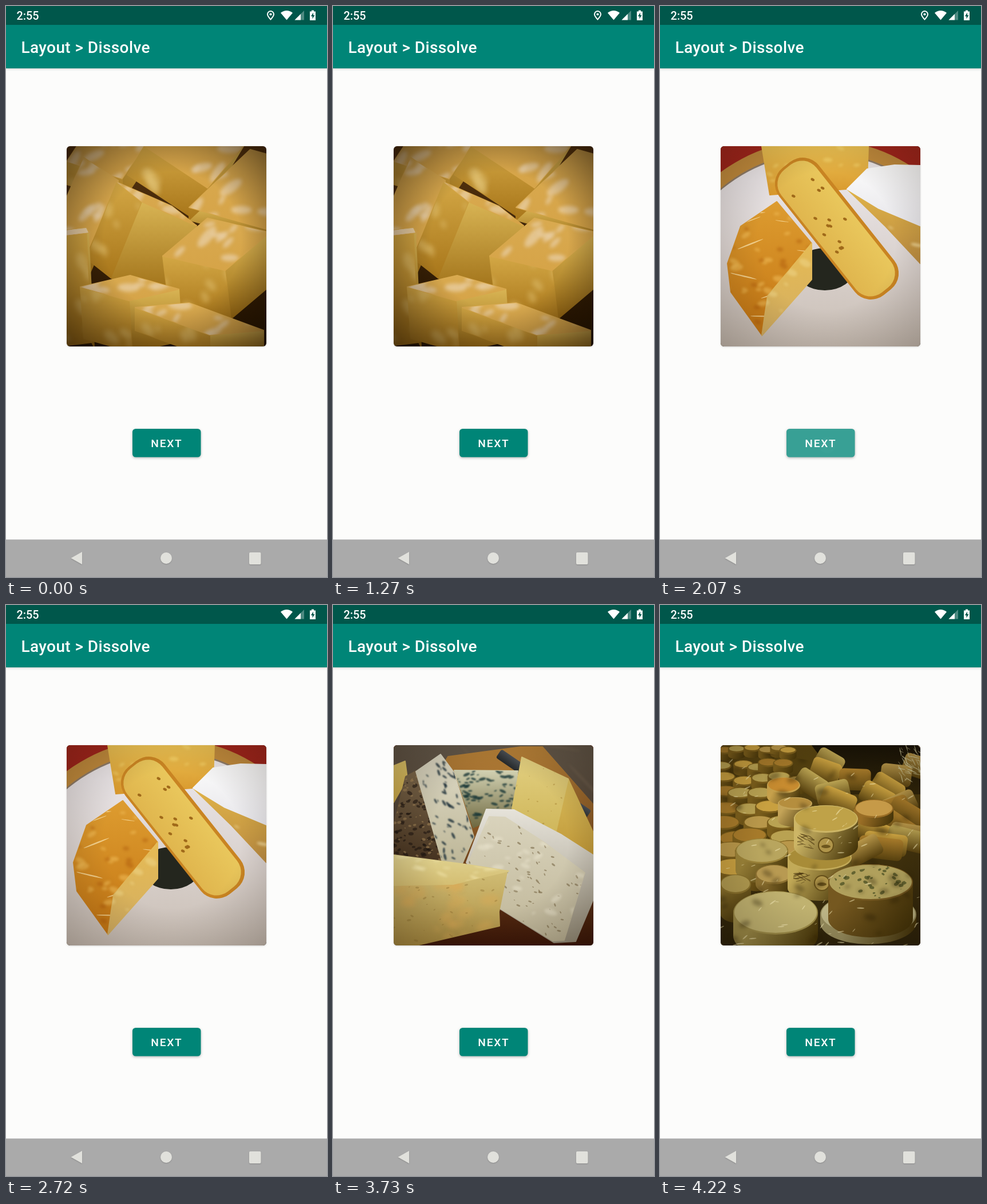
Write an HTML page with a canvas that moves like this. It is 561 px wide and 998 px high and loops after 4430 ms.

```html
<!DOCTYPE html>
<html lang="en">
<head>
<meta charset="utf-8">
<title>Layout &gt; Dissolve</title>
<style>
html, body { margin: 0; width: 100%; height: 100%; overflow: hidden; background: #fcfcfb; }
canvas { display: block; }
</style>
</head>
<body>
<canvas id="stage" width="561" height="998"></canvas>
<script>
const LOOP = 4430;
const TAPS = [1800, 2830, 3800];
const PHOTO = { x: 106, y: 245, size: 350 };
const BUTTON = [221, 739, 119.5, 49.5, 5.5];
const TOUCH = { x: 292.5, y: 768 };
const FONT = 'Roboto, "Noto Sans", sans-serif';
const ctx = document.getElementById('stage').getContext('2d');

let g, rnd;

const span = (t, a, b) => Math.min(1, Math.max(0, (t - a) / (b - a)));
const between = (a, b) => a + rnd() * (b - a);

function seeded(seed) {
  return () => {
    seed = (seed + 0x6D2B79F5) | 0;
    let r = Math.imul(seed ^ (seed >>> 15), 1 | seed);
    r = (r + Math.imul(r ^ (r >>> 7), 61 | r)) ^ r;
    return ((r ^ (r >>> 14)) >>> 0) / 4294967296;
  };
}

// cubic-bezier(.4, 0, .2, 1)
function fastOutSlowIn(x) {
  let lo = 0, hi = 1, u = x;
  for (let i = 0; i < 16; i++) {
    u = (lo + hi) / 2;
    if (1.2 * u * (1 - u) ** 2 + 0.6 * u * u * (1 - u) + u ** 3 < x) lo = u; else hi = u;
  }
  return 3 * u * u * (1 - u) + u ** 3;
}

// ---- photos, painted in their own coordinates ----

function shade(c1, c2, x0, y0, x1, y1) {
  const grad = g.createLinearGradient(x0, y0, x1, y1);
  grad.addColorStop(0, c1);
  grad.addColorStop(1, c2);
  return grad;
}

function trace(p) {
  g.beginPath();
  for (let i = 0; i < p.length; i += 2) g.lineTo(p[i], p[i + 1]);
  g.closePath();
}

function bounds(p) {
  const xs = p.filter((_, i) => i % 2 === 0), ys = p.filter((_, i) => i % 2);
  return [Math.min(...xs), Math.min(...ys), Math.max(...xs), Math.max(...ys)];
}

// Polygon shaded from top to bottom; returns its points.
function face(p, c1, c2 = c1) {
  const [, y0, , y1] = bounds(p);
  trace(p);
  g.fillStyle = g.strokeStyle = shade(c1, c2, 0, y0, 0, y1);
  g.lineJoin = 'round';
  g.lineWidth = 2;
  g.fill();
  g.stroke();
  return p;
}

// Scattered soft ellipses kept inside a polygon; returns its points.
function mottle(p, color, n, w, h, angle = 0, blur = 2) {
  const [x0, y0, x1, y1] = bounds(p);
  g.save();
  trace(p);
  g.clip();
  g.filter = `blur(${blur}px)`;
  for (let i = 0; i < n; i++) {
    const s = between(0.4, 1.3);
    oval(between(x0, x1), between(y0, y1), w * s, h * s, color, angle + between(-0.6, 0.6));
  }
  g.restore();
  return p;
}

function oval(x, y, rx, ry, fill, angle = 0) {
  g.beginPath();
  g.ellipse(x, y, rx, ry, angle, 0, 7);
  g.fillStyle = fill;
  g.fill();
}

function slab(x, y, w, h, angle, r, c1, c2) {
  g.save();
  g.translate(x, y);
  g.rotate(angle);
  g.beginPath();
  g.roundRect(-w / 2, -h / 2, w, h, r);
  g.fillStyle = shade(c1, c2, 0, -h / 2, 0, h / 2);
  g.fill();
  g.restore();
}

function wheel(x, y, rx, ry, h, top, side) {
  g.beginPath();
  g.ellipse(x, y + h, rx, ry, 0, 0, Math.PI);
  g.ellipse(x, y, rx, ry, 0, Math.PI, 2 * Math.PI);
  g.fillStyle = shade(side, '#463509', x - rx / 2, y, x + rx, y + h);
  g.fill();
  oval(x, y, rx, ry, side);
  oval(x, y - 1, rx - 2, ry - 2, top);
}

// Marbled block: nearest top corner and its left, right and downward edges.
function block([x, y], [ax, ay], [bx, by], [dx, dy]) {
  const side = (ex, ey) => [x, y, x + ex, y + ey, x + ex + dx, y + ey + dy, x + dx, y + dy];
  face(side(bx, by), '#d8b454', '#9a6a12');
  mottle(face(side(ax, ay), '#d3a745', '#a8761a'), 'rgba(232,204,130,.4)', 6, 16, 9, 1, 4);
  const top = face([x, y, x + ax, y + ay, x + ax + bx, y + ay + by, x + bx, y + by], '#d9aa50', '#d6a448');
  mottle(top, 'rgba(234,210,172,.7)', 13, 18, 7, -0.5, 3);
}

const backdrop = (c1, c2) => face([0, 0, 350, 0, 350, 350, 0, 350], c1, c2);

function vignette(alpha) {
  const v = g.createRadialGradient(185, 165, 120, 175, 175, 270);
  v.addColorStop(0, 'rgba(20,10,0,0)');
  v.addColorStop(1, `rgba(20,10,0,${alpha})`);
  g.fillStyle = v;
  g.fillRect(0, 0, 350, 350);
}

function cubes() {
  backdrop('#56340f', '#221200');
  block([97, 57], [-97, -30], [40, -60], [0, 40]);
  block([40, 175], [-60, -40], [50, -115], [-5, 60]);
  block([246, 73], [-110, -73], [63, -73], [-30, 50]);
  block([214, 107], [107, -101], [135, 38], [0, 22]);
  block([131, 97], [-43, -34], [96, 42], [-54, 133]);
  block([277, 217], [-109, -25], [78, -66], [10, 85]);
  block([34, 143], [-50, 6], [4, 8], [10, 200]);
  block([109, 270], [-85, -24], [87, -20], [6, 90]);
  block([250, 330], [-130, -48], [94, -8], [0, 40]);
  vignette(0.7);
}

function brie() {
  backdrop('#a3251c', '#7c1710');
  oval(174, 278, 291, 290, '#c08a3c');
  oval(174, 279, 269, 269, '#8f7c68');
  oval(174, 281, 268, 268, shade('#e9e4e6', '#c9beb4', 0, 60, 0, 350));
  mottle(face([72, 0, 258, 0, 256, 60, 220, 75, 86, 85], '#ecc253', '#d8972c'), 'rgba(250,222,120,.5)', 14, 9, 4);
  oval(182, 215, 51, 37, '#24261e');
  mottle(face([221, 75, 349, 90, 349, 205, 288, 140], '#e0b348', '#b98a40'), 'rgba(246,226,170,.7)', 12, 12, 3, 0.5);
  face([221, 75, 256, 40, 304, 33, 349, 34, 349, 139, 275, 108], '#fbfbfb', '#e7e6ea');

  const rind = face([35, 140, 98, 97, 159, 170, 72, 330, 18, 255, 12, 205], '#dd9c30', '#c57613');
  mottle(rind, 'rgba(240,190,90,.55)', 24, 10, 5);
  mottle(rind, 'rgba(170,85,10,.4)', 24, 6, 4);
  mottle(rind, 'rgba(252,232,180,.7)', 9, 20, 1, 0.2, 0.5);
  mottle(face([159, 170, 159, 233, 72, 331, 82, 262], '#e6bb54', '#d3ae62'), 'rgba(240,215,140,.5)', 10, 9, 5);

  slab(203, 144, 284, 88, 0.9, 36, '#c98422', '#c98422');
  slab(202, 144, 274, 78, 0.9, 32, '#e9c75c', '#e0b64e');
  for (let i = 0; i < 14; i++) {
    const along = between(-100, 90), across = between(-26, 26);
    oval(202 + along * 0.62 - across * 0.78, 144 + along * 0.78 + across * 0.62, 3.5, 2.3, '#a06a1a', 0.5);
  }
  vignette(0.28);
}

function board() {
  mottle(backdrop('#655a4c', '#2e1c10'), 'rgba(140,120,96,.3)', 40, 40, 2, 0.5);
  face([95, 20, 222, 3, 260, 3, 350, 105, 350, 350, 0, 350, 0, 185], '#b88238', '#3c1608');
  face([0, 36, 20, 28, 24, 58, 0, 100], '#e5ca6c', '#c9a848');
  slab(262, 68, 190, 18, 0.6, 4, '#4a5056', '#25282a');

  const blue = face([106, 44, 217, 45, 209, 112, 139, 144], '#d2d1b2', '#6e6840');
  mottle(blue, 'rgba(24,54,54,.8)', 90, 5, 2, 0, 0.8);
  const crust = face([21, 55, 40, 45, 84, 201, 0, 193, 0, 139], '#7c684c', '#463320');
  mottle(crust, 'rgba(30,22,16,.6)', 90, 4, 2.5, 0, 0.7);
  mottle(crust, 'rgba(172,140,92,.5)', 70, 3, 2, 0, 0.7);
  const vein = face([39, 46, 82, 16, 105, 47, 140, 160, 120, 207, 84, 201], '#dedac6', '#beb798');
  mottle(vein, 'rgba(28,46,56,.8)', 110, 5, 1.8, 1, 0.8);

  face([305, 59, 350, 155, 350, 191, 283, 154], '#d8bc5c', '#c09838');
  const wedge = face([224, 21, 305, 59, 283, 154, 207, 111], '#e2cf80', '#cfb65a');
  mottle(wedge, 'rgba(168,132,52,.5)', 24, 1.8, 1.2, 0, 0.4);

  face([127, 205, 162, 112, 210, 113, 294, 157, 350, 193, 350, 267, 318, 343, 280, 345, 184, 285], '#e6e3da', '#9a927e');
  const white = face([131, 205, 167, 125, 195, 126, 262, 169, 334, 223, 298, 341, 278, 342, 186, 285], '#d9d3bc', '#bfb698');
  mottle(white, 'rgba(120,104,70,.6)', 110, 3, 1.3, 0.6, 0.6);
  mottle(white, 'rgba(236,230,208,.5)', 35, 9, 4);

  const cut = face([0, 243, 198, 222, 184, 291, 185, 316, 44, 349, 0, 350], '#d0bc74', '#ac8e42');
  mottle(cut, 'rgba(220,170,86,.4)', 24, 14, 8, 0, 4);
  mottle(cut, 'rgba(140,110,48,.4)', 40, 3, 1.4, 0, 0.6);
  mottle(face([0, 192, 124, 208, 201, 220, 104, 243, 0, 245], '#e0d290', '#d4be72'), 'rgba(244,232,176,.6)', 16, 14, 3);
  vignette(0.34);
}

function market() {
  backdrop('#574310', '#2c220a');
  face([160, 0, 350, 0, 350, 85, 224, 85], '#171206', '#30250a');
  const pick = () => ['#b8974a', '#b9a252', '#a67a2a', '#c8a040'][Math.floor(rnd() * 4)];

  // The stacks grow larger towards the front.
  for (let row = 0; row < 9; row++) {
    const r = 15 + row * 2.5;
    for (let x = 0; x < 130; x += r * 1.5) {
      wheel(x + between(0, r), 10 + row * 25 + between(-5, 5), r, r * 0.45, r * 0.7, pick(), '#7c5f1c');
    }
  }
  for (let i = 0; i < 22; i++) {
    const d = i / 22;
    slab(between(140 + 80 * d, 345), 30 + 165 * d, 50 + 30 * d, 38, between(-0.5, 0.7), 8, pick(), '#57410f');
  }
  mottle([310, 0, 350, 0, 350, 65, 310, 65], 'rgba(208,204,160,.7)', 50, 7, 0.7, 0.8, 0.3);

  wheel(110, 70, 29, 14, 20, '#c88c30', '#c8a24c');
  wheel(268, 111, 34, 16, 16, '#c69a48', '#9a6e26');
  wheel(130, 102, 30, 11, 30, '#b58e3e', '#c4a458');
  wheel(72, 185, 46, 22, 34, '#b8a55e', '#9a8238');
  wheel(26, 243, 27, 17, 50, '#b09a50', '#88702c');
  wheel(93, 226, 32, 17, 17, '#b89a52', '#8c7030');
  wheel(173, 197, 56, 22, 53, '#a88c38', '#c2aa58');
  wheel(184, 129, 56, 24, 48, '#bfa248', '#cdb666');
  for (const [x, y] of [[184, 175], [177, 241]]) {
    oval(x, y, 14, 14, '#66501a');
    oval(x, y, 12, 12, '#b0954a');
    oval(x, y + 2, 8, 3, '#6d561d');
    mottle([x - 50, y - 22, x - 20, y - 14, x - 20, y + 8, x - 50, y], 'rgba(78,58,18,.6)', 16, 9, 1, 0.2, 0.4);
  }
  wheel(96, 293, 74, 38, 40, '#c0b270', '#9c8b48');
  wheel(258, 296, 84, 38, 14, '#bdb586', '#958b5c');
  wheel(262, 240, 74, 32, 64, '#b0a05c', '#755820');
  mottle([195, 225, 290, 210, 330, 245, 280, 268, 210, 255], 'rgba(68,74,32,.7)', 50, 4, 2.5, 0, 0.7);
  const all = [0, 0, 350, 60, 350, 350, 0, 350];
  mottle(all, 'rgba(40,28,4,.35)', 60, 9, 5, 0, 3);
  mottle(all, 'rgba(250,240,190,.5)', 90, 5, 0.9, -0.5, 0.6);
  vignette(0.3);
}

const photos = [cubes, brie, board, market].map((paint, i) => {
  const c = document.createElement('canvas');
  c.width = c.height = PHOTO.size;
  g = c.getContext('2d');
  rnd = seeded(11 + i);
  paint();
  return c;
});

// ---- screen ----

function box(x, y, w, h, r, fill) {
  ctx.beginPath();
  ctx.roundRect(x, y, w, h, r);
  ctx.fillStyle = fill;
  ctx.fill();
}

function disc(x, y, r, fill) {
  ctx.beginPath();
  ctx.arc(x, y, r, 0, 7);
  ctx.fillStyle = fill;
  ctx.fill();
}

function raised(color, blur, dy, paint) {
  ctx.save();
  ctx.shadowColor = color;
  ctx.shadowBlur = blur;
  ctx.shadowOffsetY = dy;
  paint();
  ctx.restore();
}

// Runs paint inside a rounded box.
function inside(shape, paint) {
  ctx.save();
  ctx.beginPath();
  ctx.roundRect(...shape);
  ctx.clip();
  paint();
  ctx.restore();
}

function label(text, x, y, size, spacing) {
  ctx.font = `500 ${size}px ${FONT}`;
  ctx.letterSpacing = spacing + 'px';
  ctx.fillStyle = '#fff';
  ctx.fillText(text, x, y);
}

function icon(d, fill = '#fff') {
  ctx.fillStyle = fill;
  ctx.fill(new Path2D(d), 'evenodd');
}

function statusBar(t) {
  box(0, 0, 561, 33, 0, '#00574b');
  label('2:55', 18.5, 24, 19.8, 0);
  if (t < 2240) {
    icon('M462.5 25Q456 18 456 14.500A6.500 6.500 0 0 1 469 14.500Q469 18 462.500 25Z' +
      'M462.500 22Q458 17 458 14.500A4.500 4.500 0 0 1 467 14.500Q467 17 462.500 22Z');
    disc(462.5, 14.5, 2.1, '#fff');
  }
  icon('M480 12Q490.500 4 501 12L490.500 24.500Z');
  icon('M521 8V24.500H504.500Z', 'rgba(255,255,255,.3)');
  icon('M515 14V24.500H504.500Z');
  icon('M534 7.500h4v2h3v15.500h-10v-15.500h3zM537 11.500l-4 6.500h2.500v4.500l4-6.500h-2.500z');
}

function navBar() {
  const light = '#e1e1dc';
  box(0, 932.5, 561, 66, 0, '#aaaaaa');
  raised('rgba(0,0,0,.2)', 2, 1, () => {
    icon('M113.500 965L133 954V976Z', light);
    disc(280, 965, 10, light);
    box(425, 955, 20.5, 21, 2, light);
  });
}

function photo(t) {
  const { x, y, size } = PHOTO, frame = [x, y, size - 1, size, 6];
  raised('rgba(0,0,0,.16)', 3, 1, () => box(...frame, '#ccc'));
  inside(frame, () => photos.forEach((img, i) => {
    const begin = TAPS[i - 1] + 60;
    ctx.globalAlpha = i ? fastOutSlowIn(span(t, begin, begin + 190)) : 1;
    ctx.drawImage(img, x, y);
  }));
}

function ripple(dt) {
  const grow = span(dt, 60, 200), a = 0.24 * (1 - span(dt, 260, 390));
  if (grow && a) inside(BUTTON, () => disc(TOUCH.x, TOUCH.y, 20 + 70 * grow, `rgba(255,255,255,${a})`));
}

function touchDot(dt) {
  if (dt < 0) return;
  const { x, y } = TOUCH;
  const halo = ctx.createRadialGradient(x, y, 13, x, y, 20);
  halo.addColorStop(0, 'rgba(255,255,255,.28)');
  halo.addColorStop(1, 'rgba(255,255,255,0)');
  ctx.globalAlpha = 1 - span(dt, 70, 275);
  disc(x, y, 20, halo);
  disc(x, y, 14, 'rgba(232,240,238,.52)');
  ctx.globalAlpha = 1;
}

function draw(t) {
  box(0, 0, 561, 998, 0, '#fcfcfb');
  raised('rgba(0,0,0,.2)', 4, 1, () => box(0, 33, 561, 76, 0, '#008577'));
  statusBar(t);
  label('Layout > Dissolve', 26.4, 81.5, 28, 0.38);
  photo(t);
  raised('rgba(0,0,0,.28)', 4, 1.5, () => box(...BUTTON, '#008577'));
  TAPS.forEach(tap => ripple(t - tap));
  label('NEXT', 253.3, 771, 19.2, 1.7);
  TAPS.forEach(tap => touchDot(t - tap));
  navBar();
}

const start = performance.now();
function tick() {
  draw((performance.now() - start) % LOOP);
  requestAnimationFrame(tick);
}
tick();
</script>
</body>
</html>
```
